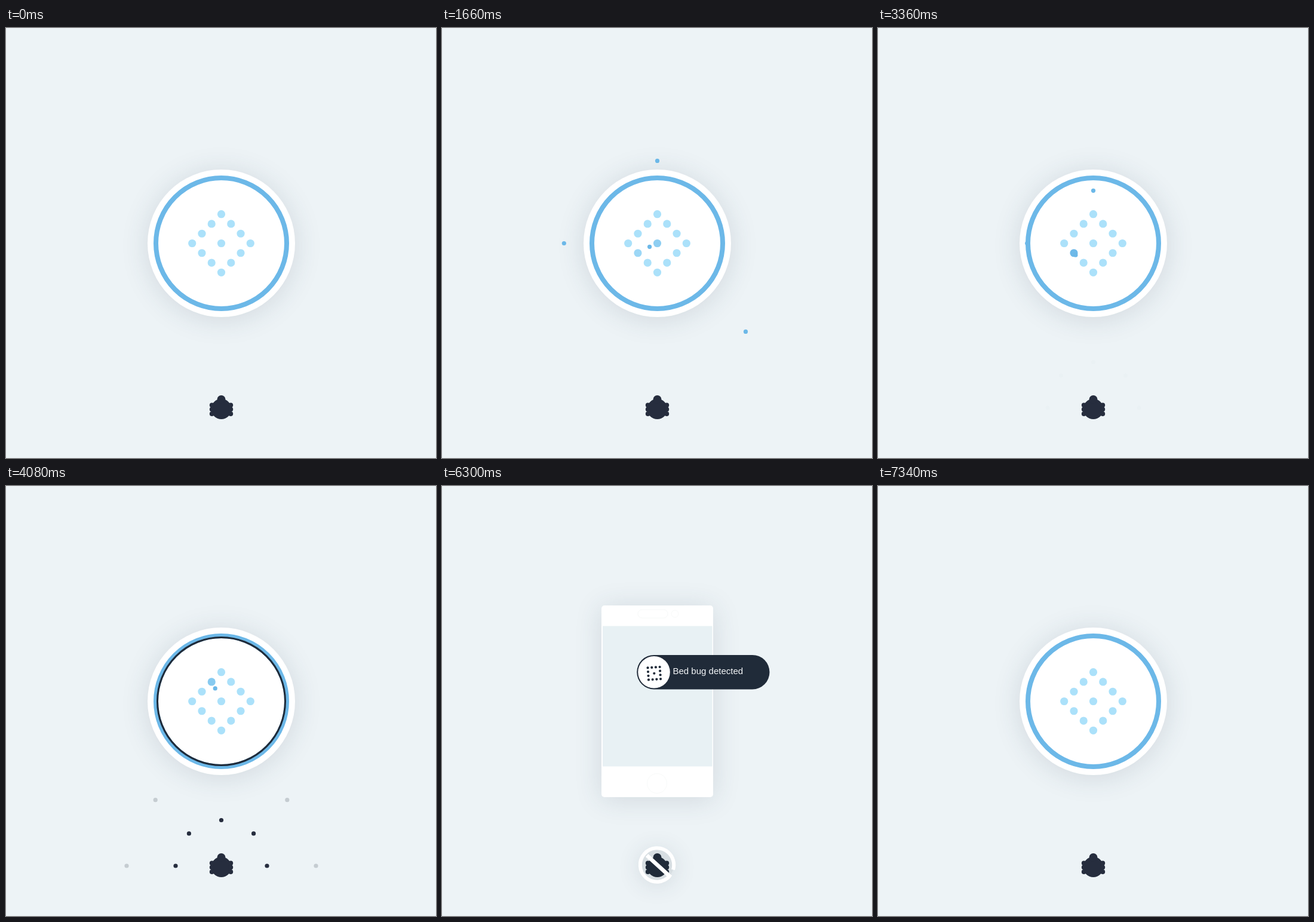
An HTML page with a canvas that plays this animation: 720x720 px, repeating every 7360 ms.

```html
<!DOCTYPE html>
<html>
<head>
<meta charset="utf-8">
<style>
html, body { margin: 0; width: 100%; height: 100%; overflow: hidden; background: #edf3f6; }
canvas { display: block; }
</style>
</head>
<body>
<canvas id="stage" width="720" height="720"></canvas>
<script>
const ctx = document.getElementById('stage').getContext('2d');
const LOOP = 7360, TRAVEL = 750, CX = 360.5, CY = 360.5;
const NAVY = '#202b39', BLUE = '#6cb8e8', BUG = '#262d3e';

// Incoming scent particles: start time and offset from the sensor centre
const particles = [
  [25, 0, -170], [60, 171, 171], [120, -160, 70], [306, 171, -74],
  [780, 0, -170], [862, 171, 171], [955, -220, 99],
  [1520, 0, -170], [1560, 171, 171], [1600, -170, 0], [1665, 100, 220],
  [2256, -171, -171], [2394, -170, 0], [2500, 220, -100], [2750, -160, 106],
  [3000, 0, -170], [3100, -170, 0], [3405, -104, -219]
];

// Square outline of dots, four per side, plus one in the middle
const grid = [[0, 0]];
for (let i = -1.5; i < 2; i++)
  for (let j = -1.5; j < 2; j++)
    if (Math.abs(i) === 1.5 || Math.abs(j) === 1.5) grid.push([i, j]);

const lerp = (a, b, k) => a + (b - a) * k;
const clamp = v => Math.max(0, Math.min(1, v));
const mix = (a, b, k) => `rgb(${a.map((v, i) => Math.round(lerp(v, b[i], k)))})`;

function dot(x, y, r, color) {
  ctx.fillStyle = color;
  ctx.beginPath();
  ctx.arc(x, y, r, 0, 7);
  ctx.fill();
}

function box(x, y, w, h, r, color) {
  ctx.fillStyle = color;
  ctx.beginPath();
  ctx.roundRect(x, y, w, h, r);
  ctx.fill();
}

function arc(x, y, r, width, color, from = 0, to = Math.PI * 2) {
  ctx.strokeStyle = color;
  ctx.lineWidth = width;
  ctx.beginPath();
  ctx.arc(x, y, r, from, to);
  ctx.stroke();
}

function withAlpha(alpha, draw) {
  if (alpha <= 0) return;
  ctx.save();
  ctx.globalAlpha = alpha;
  draw();
  ctx.restore();
}

function shadow(blur, alpha) {
  ctx.shadowColor = `rgba(50,70,85,${alpha})`;
  ctx.shadowBlur = blur;
  ctx.shadowOffsetY = 4;
}

// Fade in, hold, fade out
const pulse = d => Math.min(clamp(d / 100), clamp((505 - d) / 225));

function bugSignals(t, p) {
  [76.5, 156].forEach((r, row) => {
    const start = 3360 + row * 260;
    const alpha = Math.max(pulse(t - start), pulse(t - start - 560)) * (1 - p);
    withAlpha(alpha, () => {
      for (let k = 0; k < 5; k++) {
        const a = Math.PI * k / 4, len = row && k % 4 === 0 ? 158.5 : r;
        dot(CX + len * Math.cos(a), 636 - len * Math.sin(a), 3.6, BUG);
      }
    });
  });
}

function bug(p) {
  withAlpha(p, () => {
    shadow(40, .16);
    dot(360, 634.5, 28, '#d7dee2');
  });
  const color = mix([38, 45, 62], [32, 43, 57], p);
  dot(CX, 638, 17, color);
  dot(CX, 622, 7, color);
  for (const y of [631.5, 638.5, 646])
    for (const side of [-1, 1]) dot(CX + side * 15.7, y, 4, color);
  if (p <= 0) return;
  const from = .72;
  arc(360, 634.5, 28.2, 6, '#fff', from, from + 5.85 * p);
  ctx.lineWidth = 6.5;
  ctx.beginPath();
  ctx.moveTo(383, 655);
  ctx.lineTo(lerp(383, 343, p), lerp(655, 618.5, p));
  ctx.stroke();
}

function body(t, p, q) {
  const w = lerp(247, 187, p), h = lerp(247, 321, p);
  ctx.save();
  shadow(46, .15);
  box(CX - w / 2, CY - h / 2, w, h, lerp(123.5, 5, p), '#fff');
  ctx.restore();
  withAlpha(1 - p * 2, () => {
    arc(CX, CY, 109.5, 8, BLUE);
    const dark = t < 5400 ? 8 * clamp((t - 3900) / 480) : 6 * clamp((7300 - t) / 640);
    if (dark > 0) arc(CX, CY, 105.5 + dark / 2, dark, NAVY);
  });
  withAlpha(p, () => {
    const sh = 235 * q;
    box(269, 352 - sh / 2, 183.5, sh, 0, '#e8f1f4');
    arc(360, 498, 16.5, 1, '#f8faf9');
    ctx.strokeStyle = '#f7f9f8';
    ctx.beginPath();
    ctx.roundRect(328, 207, 50, 14, 7);
    ctx.stroke();
    arc(390, 214, 6, 1, '#f8faf9');
  });
}

function pill(u) {
  if (u <= 0) return;
  const s = 1 - Math.exp(-.00539 * u) * Math.cos(2 * Math.PI * u / 308);
  ctx.save();
  ctx.translate(355, 311.7);
  ctx.scale(s, s);
  box(-29, -29, 224, 58, 29, NAVY);
  dot(0, 0, 27, '#fff');
  ctx.restore();
  withAlpha(clamp((u - 60) / 60), () => {
    ctx.font = '15px "Liberation Sans", Arial, sans-serif';
    ctx.fillStyle = '#f4f7f9';
    ctx.fillText('Bed bug detected', 386.5, 315);
  });
}

// Glow left on a grid dot by particles that have just crossed it
function glow(t, x, y) {
  let best = 0;
  const reach = Math.hypot(x, y);
  for (const [start, px, py] of particles) {
    const len = Math.hypot(px, py);
    const miss = Math.hypot(px / len * reach - x, py / len * reach - y);
    if (miss > 8) continue;
    const since = t - start - TRAVEL * (1 - reach / len);
    if (since >= 0) best = Math.max(best, 1 - since / 90);
  }
  return best;
}

function icon(t, q) {
  const gap = lerp(23, 6.7, q), angle = lerp(-45, -4, q) * Math.PI / 180;
  const c = Math.cos(angle), s = Math.sin(angle);
  const x0 = lerp(CX, 355.3, q), y0 = lerp(CY, 313.7, q);
  for (const [i, j] of grid) {
    const x = (i * c - j * s) * gap, y = (i * s + j * c) * gap;
    const lit = q > 0 ? 0 : glow(t, x, y);
    const base = [171, 225, 250].map((v, k) => lerp(v, [108, 184, 232][k], lit));
    dot(x0 + x, y0 + y, lerp(6.6, 2.1, q), mix(base, [32, 43, 57], q));
  }
}

function incoming(t) {
  for (const [start, x, y] of particles) {
    const k = 1 - (t - start) / TRAVEL;
    if (k >= 0 && k <= 1) dot(CX + x * k, CY + y * k, 3.6, BLUE);
  }
}

function frame(now) {
  const t = now % LOOP;
  // Alert progress, played back at double speed on the way out
  const u = Math.max(0, t < 5400 ? t - 4295 : (6640 - t) * 2);
  const p = 1 - Math.exp(-u / 55), q = 1 - Math.exp(-u / 92);
  ctx.fillStyle = '#edf3f6';
  ctx.fillRect(0, 0, 720, 720);
  bugSignals(t, p);
  bug(p);
  body(t, p, q);
  pill(u);
  icon(t, q);
  incoming(t);
}

const begin = performance.now();
function tick() {
  frame(performance.now() - begin);
  requestAnimationFrame(tick);
}
tick();
</script>
</body>
</html>
```
